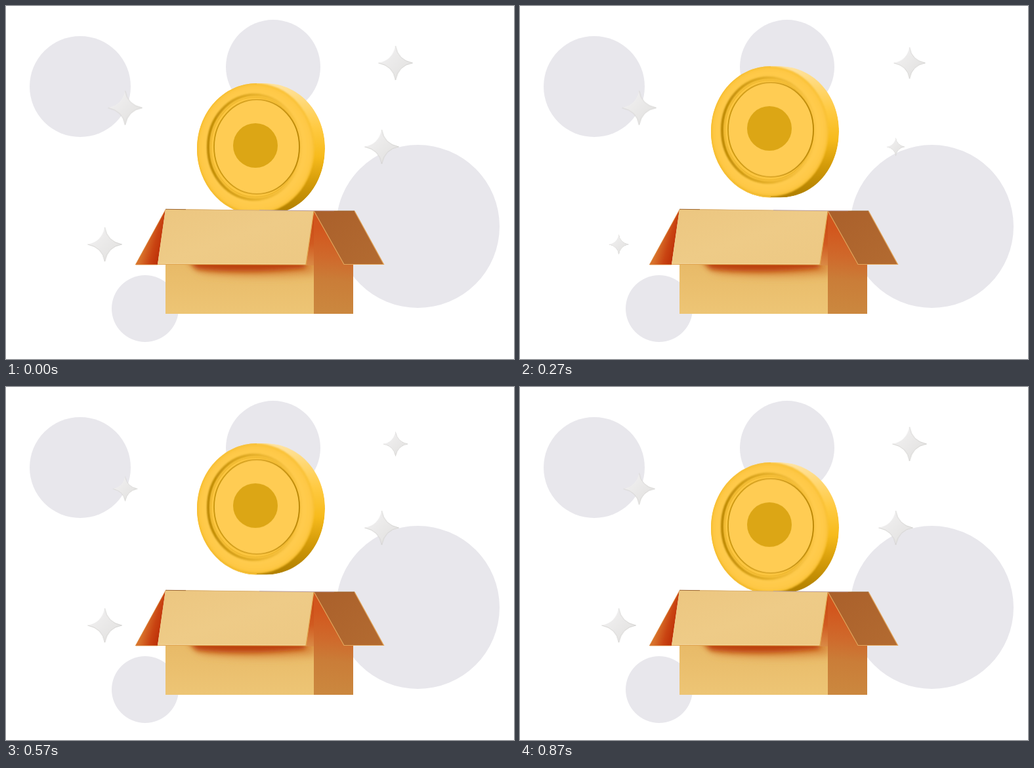
Write an HTML page that moves like this. It is 774x539 px and loops after 0.9 s.

```html
<!DOCTYPE html>
<html lang="en">
<head>
<meta charset="utf-8">
<title>Coin and box</title>
<style>
  html, body { margin: 0; width: 100%; height: 100%; overflow: hidden; background: #fff; }
  svg { display: block; width: 774px; height: 539px; }

  .coin, .star { animation: 900ms infinite; }
  .coin { animation-name: bob; animation-timing-function: steps(15); }
  .star { animation-timing-function: steps(1); }
  .s1 { animation-name: twinkle1; }
  .s2 { animation-name: twinkle2; }
  .s3 { animation-name: twinkle3; }
  .s4 { animation-name: twinkle4; }

  /* one step per 30 ms */
  @keyframes bob {
    0%, 100% { transform: translateY(0); }
    50% { transform: translateY(-43.5px); }
  }
  @keyframes twinkle1 {
    0% { transform: scale(1); animation-timing-function: steps(7); }
    23.3333% { transform: scale(.43); animation-timing-function: steps(8); }
    50%, 100% { transform: scale(1); }
  }
  @keyframes twinkle2 {
    0% { transform: scale(1); }
    3.3333% { transform: scale(1); animation-timing-function: steps(7); }
    26.6667% { transform: scale(.44); animation-timing-function: steps(7); }
    50%, 100% { transform: scale(1); }
  }
  @keyframes twinkle3 {
    0% { transform: scale(1); }
    26.6667% { transform: scale(1); animation-timing-function: steps(7); }
    50% { transform: scale(.43); animation-timing-function: steps(8); }
    76.6667%, 100% { transform: scale(1); }
  }
  @keyframes twinkle4 {
    0% { transform: scale(1); }
    50% { transform: scale(1); animation-timing-function: steps(8); }
    76.6667% { transform: scale(.45); animation-timing-function: steps(7); }
    100% { transform: scale(1); }
  }
</style>
</head>
<body>
<svg viewBox="0 0 774 539" xmlns="http://www.w3.org/2000/svg">
  <defs>
    <linearGradient id="starFill" x1="0" y1="0" x2="1" y2="1">
      <stop offset=".3" stop-color="#eeeded"/>
      <stop offset=".7" stop-color="#e6e5e4"/>
    </linearGradient>
    <g id="star">
      <path d="M0-27Q3.500-4.500 27 0Q4.500 3.500 0 27Q-3.500 4.500-27 0Q-4.500-3.500 0-27Z" fill="url(#starFill)"/>
      <path d="M0-26Q3.500-4.500 26 0Q4.500 3.500 0 26Q-3.500 4.500-26 0" fill="none" stroke="#d0cecc" stroke-width=".8"/>
    </g>

    <linearGradient id="side" gradientUnits="userSpaceOnUse" x1="432" y1="120" x2="440" y2="312">
      <stop offset="0" stop-color="#ffe3a0"/>
      <stop offset=".16" stop-color="#ffd771"/>
      <stop offset=".35" stop-color="#ffca42"/>
      <stop offset=".58" stop-color="#f7bb1c"/>
      <stop offset=".78" stop-color="#d59c0a"/>
      <stop offset="1" stop-color="#b28100"/>
    </linearGradient>
    <radialGradient id="face">
      <stop offset=".85" stop-color="#ffcb4d"/>
      <stop offset=".95" stop-color="#fec845"/>
      <stop offset="1" stop-color="#f8bf30"/>
    </radialGradient>
    <linearGradient id="groove">
      <stop offset="0" stop-color="#b88400"/>
      <stop offset=".2" stop-color="#cd980f"/>
      <stop offset=".6" stop-color="#ecb631"/>
      <stop offset="1" stop-color="#fbc646"/>
    </linearGradient>
    <linearGradient id="lip">
      <stop offset="0" stop-color="#c9960f"/>
      <stop offset=".5" stop-color="#dda82a"/>
      <stop offset="1" stop-color="#b88606"/>
    </linearGradient>

    <linearGradient id="front" x1="0" y1="0" x2="0" y2="1">
      <stop offset="0" stop-color="#e8ba68"/>
      <stop offset="1" stop-color="#edc575"/>
    </linearGradient>
    <linearGradient id="strip" x1="0" y1="0" x2="0" y2="1">
      <stop offset="0" stop-color="#c9420f"/>
      <stop offset=".6" stop-color="#d05a20"/>
      <stop offset="1" stop-color="#d98a45"/>
    </linearGradient>
    <linearGradient id="right" gradientUnits="userSpaceOnUse" x1="495" y1="340" x2="484" y2="470">
      <stop offset="0" stop-color="#d2561d"/>
      <stop offset=".35" stop-color="#cf6a2c"/>
      <stop offset=".6" stop-color="#ca7d38"/>
      <stop offset="1" stop-color="#cb883f"/>
    </linearGradient>
    <linearGradient id="flap" x1="0" y1="0" x2="1" y2="1">
      <stop offset="0" stop-color="#ecc680"/>
      <stop offset=".5" stop-color="#eecb87"/>
      <stop offset="1" stop-color="#edc883"/>
    </linearGradient>
    <linearGradient id="leftFlap" gradientUnits="userSpaceOnUse" x1="210" y1="368" x2="238" y2="376">
      <stop offset="0" stop-color="#d8702a"/>
      <stop offset=".5" stop-color="#c94412"/>
      <stop offset="1" stop-color="#bb2c05"/>
    </linearGradient>
    <linearGradient id="rightFlap" x1="0" y1="0" x2="1" y2="1">
      <stop offset="0" stop-color="#aa602b"/>
      <stop offset="1" stop-color="#b36b31"/>
    </linearGradient>
    <filter id="soft" x="-20%" y="-100%" width="140%" height="300%"><feGaussianBlur stdDeviation="7"/></filter>
    <filter id="softer" x="-20%" y="-100%" width="140%" height="300%"><feGaussianBlur stdDeviation="4"/></filter>
    <filter id="blur" x="-10%" y="-10%" width="120%" height="120%"><feGaussianBlur stdDeviation="1"/></filter>
    <clipPath id="frontClip"><path d="M243 394H469V470H243Z"/></clipPath>
    <clipPath id="coinClip"><path id="body" d="M382 118H397C449 119 486 164 486 217C486 274 448 318 397 318.500H382C330 318 291 272 291 218C291 163 331 118 382 118Z"/></clipPath>
  </defs>

  <g fill="#e8e7ec">
    <circle cx="113" cy="123" r="77"/>
    <circle cx="407" cy="93" r="72"/>
    <circle cx="627.5" cy="336.5" r="124.5"/>
    <circle cx="212" cy="462" r="51"/>
  </g>

  <g transform="translate(150.500 364)"><g class="star s1"><use href="#star"/></g></g>
  <g transform="translate(572.500 215)"><g class="star s2"><use href="#star"/></g></g>
  <g transform="translate(593.500 87)"><g class="star s3"><use href="#star"/></g></g>
  <g transform="translate(181.500 155.500)"><g class="star s4"><use href="#star"/></g></g>

  <g class="coin">
    <g clip-path="url(#coinClip)">
      <use href="#body" fill="url(#side)"/>
      <ellipse cx="380.500" cy="217.500" rx="89.500" ry="99.500" fill="url(#face)" filter="url(#blur)"/>
      <path d="M291 218C291 163 331 118 382 118M291 218C291 272 330 318 382 318" fill="none" stroke="#f8c035" stroke-width="3"/>
    </g>
    <ellipse cx="378" cy="215.500" rx="70.500" ry="80" fill="#fcc640"/>
    <ellipse cx="378.500" cy="215.500" rx="70.500" ry="80" fill="none" stroke="url(#groove)" stroke-width="4" filter="url(#blur)"/>
    <ellipse cx="380" cy="215.500" rx="67.500" ry="76" fill="none" stroke="#eeb62d" stroke-width="1.200"/>
    <ellipse cx="382" cy="215" rx="65" ry="72" fill="#ffcc53" stroke="url(#lip)" stroke-width="1.800"/>
    <circle cx="380" cy="213" r="34" fill="#dca615"/>
  </g>

  <g>
    <path d="M243 310L469 313V470H243Z" fill="#e8ba68"/>
    <path d="M243 394H469V470H243Z" fill="url(#front)"/>
    <g clip-path="url(#frontClip)">
      <path d="M276 384H474V408Q380 416 300 406Z" fill="#d98a3e" filter="url(#soft)"/>
      <path d="M276 386H456V400Q370 410 290 402Z" fill="#bb3f0c" filter="url(#softer)"/>
    </g>
    <path d="M469 313L457 396H469Z" fill="url(#strip)"/>
    <path d="M469 313H529V470H469Z" fill="url(#right)"/>

    <path d="M243 311L197 395H231Z" fill="url(#leftFlap)"/>
    <path d="M243 311L197.500 395H231" fill="none" stroke="#dc9347" stroke-width=".8"/>

    <path d="M469 313L531 313L576 395H515Z" fill="url(#rightFlap)"/>
    <path d="M469.500 313.500L515 394.500H575.500L531 313" fill="none" stroke="#e2a55b" stroke-width="1.200"/>

    <path d="M243 310L469 313L457 395L231 394.500Z" fill="url(#flap)"/>
    <path d="M469 313L457 394.800L231 394.300" fill="none" stroke="#e0a44e" stroke-width="1.200"/>
    <path d="M231.500 393.300L456 393.800" stroke="#f5dba6" stroke-width=".8"/>
    <path d="M243 310.300L274 310.700M500 313H531" stroke="#9b6531" stroke-width="1"/>
    <path d="M274 310.800L386 312" stroke="#d6ad72" stroke-width=".9"/>
    <path d="M386 311.800L469 312.700H500" fill="none" stroke="#b59a9c" stroke-width="1"/>
  </g>
</svg>
</body>
</html>
```
